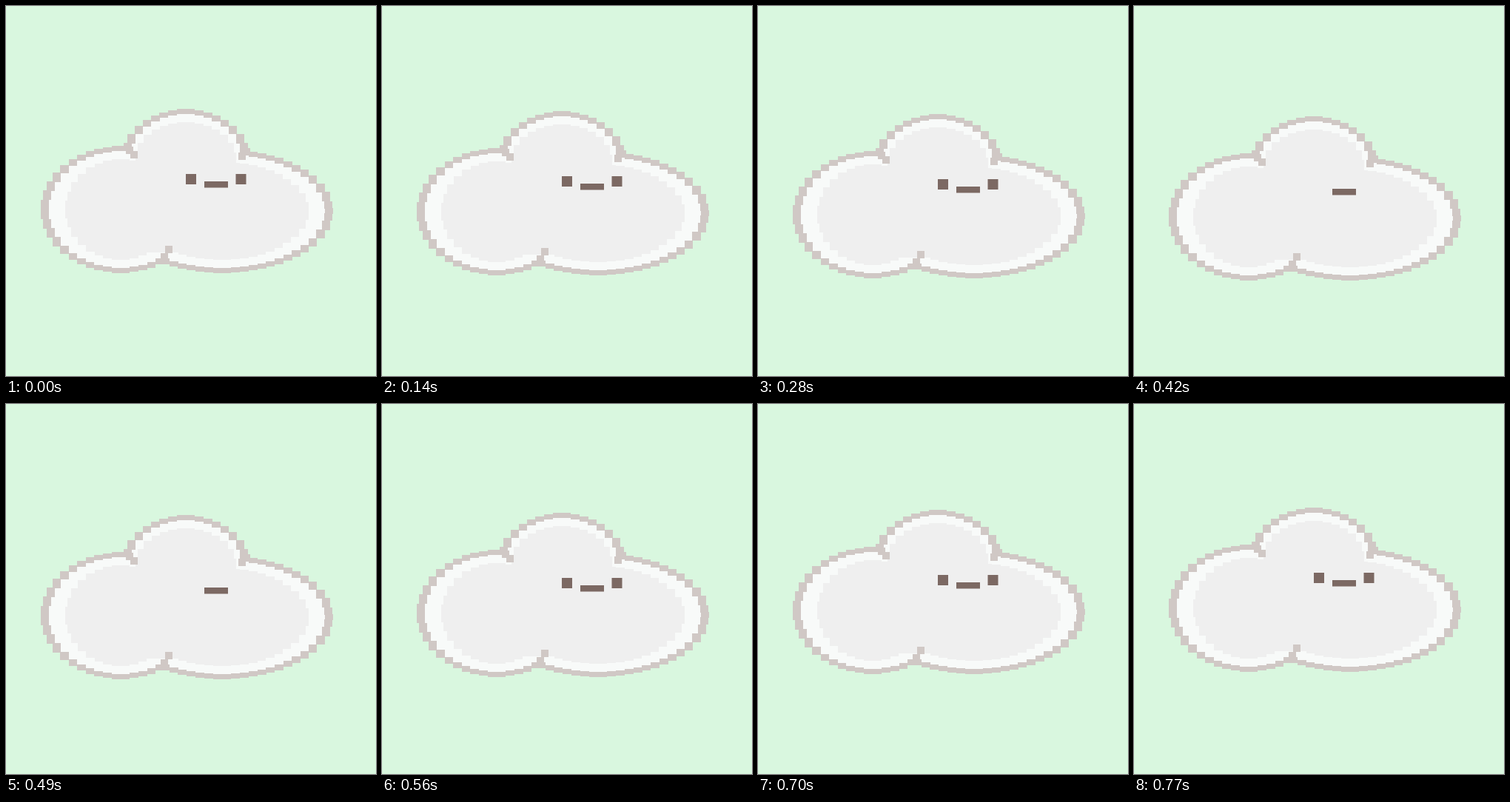
Animation of 500x500 px, one loop 840 ms. Source, as an HTML page with a canvas:

```html
<!DOCTYPE html>
<html>
<head>
<meta charset="utf-8">
<title>Cloud</title>
<style>
html, body { margin: 0; height: 100%; overflow: hidden; background: #d9f7df; }
canvas { display: block; }
</style>
</head>
<body>
<canvas id="stage" width="500" height="500"></canvas>
<script>
const ctx = document.getElementById('stage').getContext('2d');
const FRAME = 70, COUNT = 12, STEP = 12;
const SKY = '#d9f7df', OUTLINE = '#d0c8c5', RIM = '#f8faf9', BODY = '#efefef', FACE = '#7c6963';

const lobes = [
  { cx: 155, cy: 275, rx: 108, ry: 85.5, rim: 33 },
  { cx: 292, cy: 277, rx: 150, ry: 83.5, rim: 33 },
  { cx: 243, cy: 205, rx: 86, ry: 65.5, rim: 18 }
];
// Creases where two lobes meet: inner tip and the direction outwards
const creases = [
  { x: 173, y: 201, dx: -6, dy: -6 },
  { x: 319, y: 203, dx: 6, dy: -6 },
  { x: 220, y: 329, dx: -6, dy: 10 }
];

// Adds an ellipse with a staircase edge, stepping evenly along the longer axis
function addStepped(path, cx, cy, rx, ry) {
  let angle = STEP / rx, lastY = ry;
  while (lastY > 0) {
    const end = angle >= Math.PI / 2;
    const x = end ? rx : rx * Math.sin(angle);
    const y = end ? 0 : ry * Math.cos(angle);
    const w = Math.round(x), h = Math.round(lastY === ry ? ry : (lastY + y) / 2);
    path.rect(cx - w, cy - h, 2 * w, 2 * h);
    angle += STEP / Math.max(rx * Math.cos(angle), ry * Math.sin(angle));
    lastY = y;
  }
}

function layer(color, insetX, insetY) {
  const path = new Path2D();
  for (const lobe of lobes) {
    addStepped(path, lobe.cx, lobe.cy, lobe.rx - insetX(lobe), lobe.ry - insetY);
  }
  return { color, path };
}

const layers = [
  layer(OUTLINE, () => 0, 0),
  layer(RIM, () => 11, 6.5),
  layer(BODY, lobe => lobe.rim, 17.5)
];
layers[2].path.rect(185, 205, 120, 128);

function box(color, x, y, w, h = w) {
  ctx.fillStyle = color;
  ctx.fillRect(x, y, w, h);
}

function draw(now) {
  const i = Math.floor(now / FRAME) % COUNT;
  // Slow sink, quicker rise
  const bob = Math.round(Math.min(i * 5 / 3, 2.4 * (11.5 - i)));
  const blink = i === 6 || i === 7;

  ctx.setTransform(1, 0, 0, 1, 0, 0);
  box(SKY, 0, 0, 500);
  ctx.translate(0, bob);
  for (const { color, path } of layers) {
    ctx.fillStyle = color;
    ctx.fill(path);
  }
  for (const { x, y, dx, dy } of creases) {
    box(OUTLINE, x - 5, y - 5, 10);
    box(OUTLINE, x + dx - 5, y + dy - 5, 10);
  }
  box(FACE, 268, 237, 32, 8.5);
  if (!blink) for (const x of [243, 310.5]) box(FACE, x, 227, 14);
  requestAnimationFrame(draw);
}
requestAnimationFrame(draw);
</script>
</body>
</html>
```
